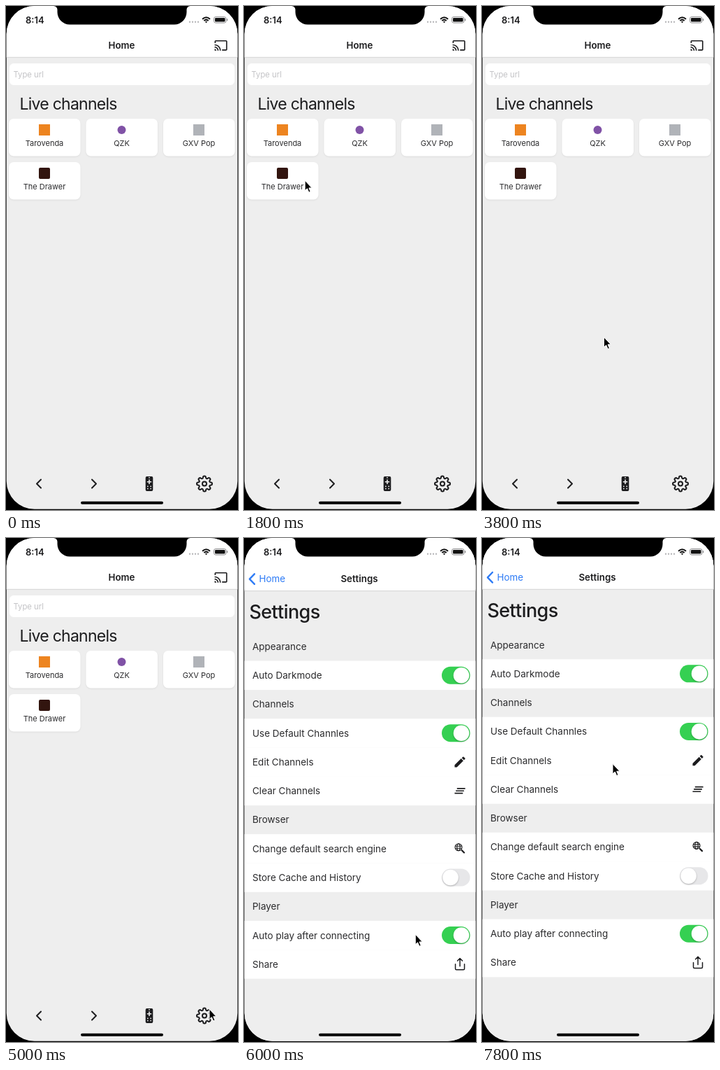
An HTML page that plays this animation: 332x720 px, repeating every 8000 ms.

```html
<!DOCTYPE html>
<html lang="en">
<head>
<meta charset="utf-8">
<title>Channel browser</title>
<style>
  html, body { margin: 0; width: 100%; height: 100%; overflow: hidden; background: #000; }
  svg { display: block; width: 100vw; height: 100vh; }
  text { font: 13.5px Inter, Roboto, sans-serif; fill: #2b2b2d; }
  .title { font-size: 13.3px; font-weight: 600; fill: #1c1c1e; text-anchor: middle; }
  .heading { font-size: 23px; letter-spacing: -.75px; fill: #1c1c1e; }
  .large { font-size: 27px; font-weight: 500; letter-spacing: -.6px; fill: #1c1c1e; }
  .label { font-size: 11px; text-anchor: middle; }
  .hint { font-size: 11.3px; fill: #c3c3c6; }
  .back { font-size: 13.4px; fill: #2f7cf6; }
  .clock { font-size: 13px; font-weight: 600; fill: #1c1c1e; }
  .line { fill: none; stroke: #1c1c1e; stroke-linecap: round; stroke-linejoin: round; }
  .card { fill: #fff; filter: drop-shadow(0 1px 1px rgba(0, 0, 0, .07)); }
  .knob { fill: #fff; filter: drop-shadow(0 1px 1px rgba(0, 0, 0, .25)); }
</style>
</head>
<body>
<svg viewBox="0 0 332 720" preserveAspectRatio="none">
  <defs>
    <clipPath id="screen"><rect x=".7" width="330.6" height="718.8" rx="40"/></clipPath>
    <g id="page">
      <rect width="332" height="720" fill="#eee"/>
      <rect width="332" height="73" fill="#fff"/>
      <rect y="72.8" width="332" height="1" fill="#d6d6d6"/>
    </g>
    <path id="gearQuarter" d="M19.4 15a1.65 1.65 0 0 0 .33 1.82l.06.06a2 2 0 0 1-2.83 2.83l-.06-.06a1.65 1.65 0 0 0-1.82-.33 1.65 1.65 0 0 0-1 1.51V21a2 2 0 0 1-4 0v-.09A1.65 1.65 0 0 0 9 19.4"/>
  </defs>

  <g clip-path="url(#screen)">
    <g id="home">
      <use href="#page"/>
      <text class="title" x="165.5" y="61">Home</text>
      <path transform="translate(297.7 46.5) scale(.82)" fill="#1c1c1e" d="M21 3H3c-1.1 0-2 .9-2 2v3h2V5h18v14h-7v2h7c1.1 0 2-.9 2-2V5c0-1.1-.9-2-2-2zM1 18v3h3c0-1.66-1.34-3-3-3zm0-4v2c2.76 0 5 2.24 5 5h2c0-3.87-3.13-7-7-7zm0-4v2c4.97 0 9 4.03 9 9h2c0-6.08-4.93-11-11-11z"/>
      <rect x="5" y="82" width="322" height="31" rx="6" fill="#fff"/>
      <text class="hint" x="10.5" y="102">Type url</text>
      <text class="heading" x="19.5" y="147.5">Live channels</text>
      <g id="cards"></g>
      <g class="line" stroke-width="2">
        <path transform="translate(47 682.5)" d="M3-6L-3 0L3 6"/>
        <path transform="translate(126 682.5)" d="M-3-6L3 0L-3 6"/>
        <g id="gear" transform="translate(272 670.5)"><circle cx="12" cy="12" r="3"/></g>
      </g>
      <g transform="translate(205 682.5)" stroke="#eee" stroke-width="1.6">
        <rect x="-5.3" y="-10.5" width="10.6" height="21" rx="2" fill="#1c1c1e" stroke="none"/>
        <path d="M0-9.5v1.6M0-6v6.400M-3.200-2.800h6.400"/>
        <path stroke-dasharray="1.600 1.600" d="M-2.200 3v5M2.200 3v5"/>
      </g>
    </g>

    <g id="settings">
      <use href="#page"/>
      <path class="line" style="stroke:#2f7cf6" stroke-width="2.4" d="M15 49l-7 7.3 7 7.3"/>
      <text class="back" x="21.5" y="61">Home</text>
      <text class="title" x="165" y="61">Settings</text>
      <text class="large" x="7.5" y="112.5">Settings</text>
      <g id="rows"></g>
    </g>

    <text class="clock" x="28" y="24.5">8:14</text>
    <path stroke="#b9b9bb" stroke-width="2.4" stroke-linecap="round" stroke-dasharray="0 4" d="M263 22.8h13"/>
    <g fill="none" stroke="#111" stroke-width="2">
      <path d="M281 18.7q5.5-4.8 11 0M283.3 21q3.2-2.7 6.4 0"/>
      <path fill="#111" stroke="none" d="M284.9 22.4q1.6-1.3 3.2 0l-1.6 1.8z"/>
      <rect x="297.5" y="15.5" width="17.5" height="8.6" rx="2.6" stroke="#8e8e90" stroke-width="1"/>
      <rect x="299" y="17" width="14.5" height="5.6" rx="1.3" fill="#111" stroke="none"/>
      <path stroke="#8e8e90" stroke-width="1.2" d="M316.6 18.3v3"/>
    </g>
    <path d="M68.2 0A5.3 5.3 0 0 1 73.5 5.3V8.8A17.7 17.7 0 0 0 91.2 26.5H240.8A17.7 17.7 0 0 0 258.5 8.8V5.3A5.3 5.3 0 0 1 263.8 0Z"/>
    <rect x="107" y="707.7" width="118" height="4" rx="2"/>
  </g>
  <path id="cursor" stroke="#fff" stroke-linejoin="round" d="M0 0V14.5L3.3 11.5L5.7 17L8 16L5.7 10.7H10Z"/>
</svg>

<script>
const get = id => document.getElementById(id);

// Channel cards
const square = (color, radius = 0) =>
  `<rect x="-8" y="-8" width="16" height="16" rx="${radius}" fill="${color}"/>`;
const channels = [
  ["Tarovenda", 55, 161, square("#ed8420")],
  ["QZK", 165.5, 161, '<circle r="6" fill="#8052a6"/>'],
  ["GXV Pop", 276, 161, square("#b0b3b8")],
  ["The Drawer", 55, 223, square("#32150f", 2)]
];
get("cards").innerHTML = channels.map(([name, x, y, mark]) => `
  <rect class="card" x="${x - 51}" y="${y}" width="102.5" height="53.5" rx="7"/>
  <g transform="translate(${x} ${y + 16})">${mark}</g>
  <text class="label" x="${x}" y="${y + 39}">${name}</text>`).join("");

get("gear").innerHTML += [0, 90, 180, 270].map(angle =>
  `<use href="#gearQuarter" transform="rotate(${angle} 12 12)"/>`).join("");

// Settings rows; icons are drawn around the centre of the row's right side
const toggle = on => `
  <rect x="-26" y="-12.5" width="40.5" height="25" rx="12.5" fill="${on ? "#35d052" : "#e7e7e9"}"/>
  <circle class="knob" cx="${on ? 2 : -13.5}" r="11.3"/>`;
const glyph = d => `<path transform="scale(.84) translate(-12 -12)" fill="#1c1c1e" d="${d}"/>`;
const pencil = glyph("M3 17.25V21h3.75L17.81 9.94l-3.75-3.75L3 17.25zM20.71 7.04c.39-.39.39-1.02 0-1.41l-2.34-2.34c-.39-.39-1.02-.39-1.41 0l-1.83 1.83 3.75 3.75 1.83-1.83z");
const clear = glyph("M5 13h14v-2H5v2zm-2 4h14v-2H3v2zM7 7v2h14V7H7z");
const search = `<g class="line" stroke-width="1.1">
  <circle cx="-2" cy="-2" r="5"/><ellipse cx="-2" cy="-2" rx="2.2" ry="5"/>
  <path d="M-6.5-3.5h9M-6.5-.5h9"/><path stroke-width="2.2" d="M2.8 2.5L6 5.7"/></g>`;
const share = `<path class="line" stroke-width="1.5" d="M-6.5 0V6.5Q-6.5 8-5 8H5Q6.5 8 6.5 6.5V0M0 3V-8M-3.5-4.7L0-8.3L3.5-4.7"/>`;

const rows = [
  ["Appearance"],
  ["Auto Darkmode", toggle(true)],
  ["Channels"],
  ["Use Default Channles", toggle(true)],
  ["Edit Channels", pencil],
  ["Clear Channels", clear],
  ["Browser"],
  ["Change default search engine", search],
  ["Store Cache and History", toggle(false)],
  ["Player"],
  ["Auto play after connecting", toggle(true)],
  ["Share", share]
];
const rowHeight = 41.26;
get("rows").innerHTML = rows.map(([name, icon = ""], i) => {
  const y = 152.6 + rowHeight * i;
  const back = icon && `<rect y="${y - rowHeight / 2}" width="332" height="${rowHeight + .2}" fill="#fff"/>`;
  return `${back}<text x="12" y="${y + 5}">${name}</text>
    <g transform="translate(309 ${y})">${icon}</g>`;
}).join("");

// Pointer stops: time, x, y
const stops = [
  [400, 185, 650], [1000, 137, 374.5], [1400, 122, 290], [2000, 75, 235], [2600, 30.5, 230],
  [3000, 40, 240], [4000, 190, 500], [5000, 291, 673], [5400, 290, 686], [5800, 290, 688],
  [6200, 200.5, 444.5], [6800, 189, 350], [7800, 187, 322.5]
];

function pointerAt(t) {
  const next = stops.findIndex(s => s[0] > t);
  if (next < 0) return stops[stops.length - 1].slice(1);
  const [t0, x0, y0] = stops[next - 1], [t1, x1, y1] = stops[next];
  const u = (t - t0) / (t1 - t0), k = u * u * (3 - 2 * u);
  return [x0 + (x1 - x0) * k, y0 + (y1 - y0) * k];
}

// Critically damped spring that lifts the settings page
const slideStart = 5566, frequency = 18.26;
function slideOffset(t) {
  const x = Math.max(0, t - slideStart) / 1000 * frequency;
  return x > 9 ? 0 : 720 * (1 + x) * Math.exp(-x);
}

function draw(t) {
  get("settings").setAttribute("transform", `translate(0 ${slideOffset(t).toFixed(2)})`);
  const visible = t >= stops[0][0];
  get("cursor").style.display = visible ? "" : "none";
  if (visible) get("cursor").setAttribute("transform", `translate(${pointerAt(t)})`);
}

let start;
function tick(now) {
  start ??= now;
  draw((now - start) % 8000);
  requestAnimationFrame(tick);
}
draw(0);
requestAnimationFrame(tick);
</script>
</body>
</html>
```
